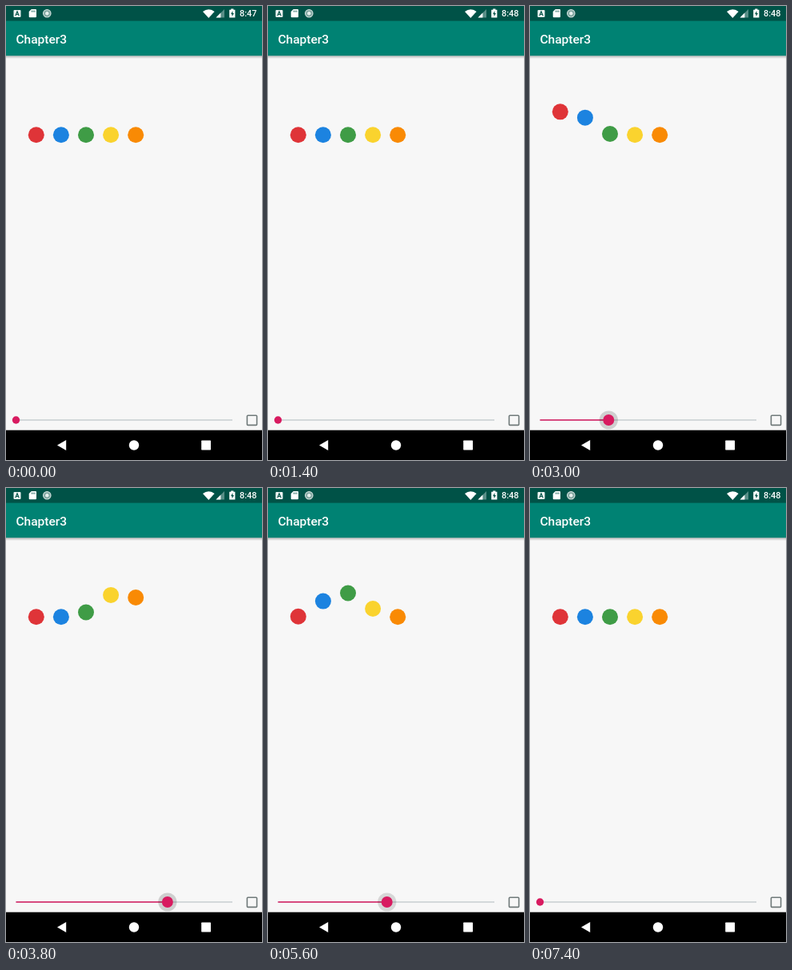
Write an HTML page that moves like this. It is 320 by 568 pixels and loops after 7800 ms.

```html
<!DOCTYPE html>
<html lang="en">
<head>
<meta charset="utf-8">
<title>Chapter3</title>
<style>
  html, body { margin: 0; width: 100%; height: 100%; overflow: hidden; background: #f7f7f7; }
  svg { display: block; width: 320px; height: 568px; }
  text { font-family: Roboto, sans-serif; font-weight: 500; fill: #fff; }
</style>
</head>
<body>
<svg viewBox="0 0 320 568">
  <defs>
    <linearGradient id="shade" x2="0" y2="1">
      <stop offset="0" stop-color="#000" stop-opacity=".27"/>
      <stop offset="1" stop-color="#000" stop-opacity="0"/>
    </linearGradient>
  </defs>
  <rect width="320" height="568" fill="#f7f7f7"/>

  <!-- app bar -->
  <rect y="62" width="320" height="4" fill="url(#shade)"/>
  <rect width="320" height="62.2" fill="#008273"/>
  <rect width="320" height="18.6" fill="#005247"/>
  <text x="12.4" y="46.5" font-size="15.56">Chapter3</text>

  <!-- status bar -->
  <rect x="9.5" y="5" width="9" height="9" rx="1" fill="#eef4f3"/>
  <path d="M11.8 12.2 14 6.8 16.2 12.2M12.6 10.5H15.4" fill="none" stroke="#005247" stroke-width="1.1"/>
  <path d="M31.8 4H37Q38 4 38 5V13.2Q38 14.2 37 14.2H29.7Q28.7 14.2 28.7 13.2V7Z" fill="#fff"/>
  <path d="M32.4 5.6V7.6M34.2 5.6V7.6M36 5.6V7.6" stroke="#005247" stroke-width=".8"/>
  <circle cx="51.3" cy="9.3" r="4.7" fill="#7fa59f" stroke="#d5e2e0" stroke-width="1.2"/>
  <circle cx="51.3" cy="9.3" r="2.2" fill="#e6efed"/>
  <path d="M246 7Q253.3 1.6 260.6 7L253.3 15Z" fill="#fff"/>
  <path d="M273 4V14.5H262.5Z" fill="#fff" opacity=".35"/>
  <path d="M268.4 8.6V14.5H262.5Z" fill="#fff"/>
  <path d="M281.2 3.6H284.4V4.7H286.4V14.6H279.2V4.7H281.2Z" fill="#fff"/>
  <path d="M283.4 6 281 10.2H282.6V13.2L285 9H283.4Z" fill="#005247"/>
  <text id="clock" x="292" y="13.4" font-size="10.9">8:47</text>

  <g id="balls"></g>

  <!-- seek bar and check box -->
  <path d="M12.5 518H283" stroke="#c7ced1" stroke-width="1.5"/>
  <path id="fill" stroke="#d81b60" stroke-width="1.6"/>
  <circle id="ripple" cy="518" r="11.6"/>
  <circle id="thumb" cy="518" fill="#d81b60"/>
  <rect x="301.4" y="512.2" width="12.2" height="12.2" rx="1" fill="none" stroke="#707a7a" stroke-width="1.6"/>

  <!-- navigation bar -->
  <rect y="530.7" width="320" height="37.3"/>
  <g fill="#fff">
    <path d="M64 549.5 75.2 543V556Z"/>
    <circle cx="160" cy="549.5" r="6.2"/>
    <rect x="244.2" y="543.6" width="11.8" height="11.8" rx=".6"/>
  </g>
</svg>
<script>
const LOOP = 7800, STEP = 200;
const $ = id => document.getElementById(id);
const set = (el, attrs) => { for (const k in attrs) el.setAttribute(k, attrs[k]); };

const balls = ['#df3438', '#1c83e0', '#3f9c46', '#fad32e', '#f98a04'].map((fill, i) => {
  const ball = document.createElementNS('http://www.w3.org/2000/svg', 'circle');
  set(ball, { cx: 37.8 + 31.1 * i, r: 10, fill });
  return $('balls').appendChild(ball);
});

// Linear interpolation through [time, value] points
function track(points, t) {
  const n = points.findIndex(p => p[0] > t);
  if (n < 0) return points[points.length - 1][1];
  if (!n) return points[0][1];
  const [t0, a] = points[n - 1], [t1, b] = points[n];
  return a + (b - a) * (t - t0) / (t1 - t0);
}

const progress = [[2200, 0], [2400, .03], [3800, .7], [4400, 1], [4600, 1], [4800, .957], [6400, .05], [6600, 0]];
const ripple = [[2200, 0], [2400, .04], [2800, .16], [4400, .16], [4800, .12], [6400, .14], [6600, .12], [7000, 0]];
const radius = [[2200, 4.7], [2400, 5.7], [2600, 7], [6600, 7], [6800, 5.7], [7000, 4.7]];

// Each ball hops once, staggered along the slider's travel
function hop(p, i) {
  const u = (p - .04 - .1225 * i) / .485;
  return u > 0 && u < 1 ? 30.5 * Math.sin(Math.PI * u) ** 2 : 0;
}

function draw(now) {
  const t = Math.floor(now % LOOP / STEP) * STEP;
  const p = track(progress, t), x = 12.5 + 270.5 * p;
  balls.forEach((ball, i) => set(ball, { cy: 161.3 - hop(p, i) }));
  set($('fill'), { d: `M12.5 518H${x}` });
  set($('ripple'), { cx: x, opacity: track(ripple, t) });
  set($('thumb'), { cx: x, r: track(radius, t) });
  $('clock').textContent = t < 1400 ? '8:47' : '8:48';
}

const start = performance.now();
function tick() {
  draw(performance.now() - start);
  requestAnimationFrame(tick);
}
tick();
</script>
</body>
</html>
```
